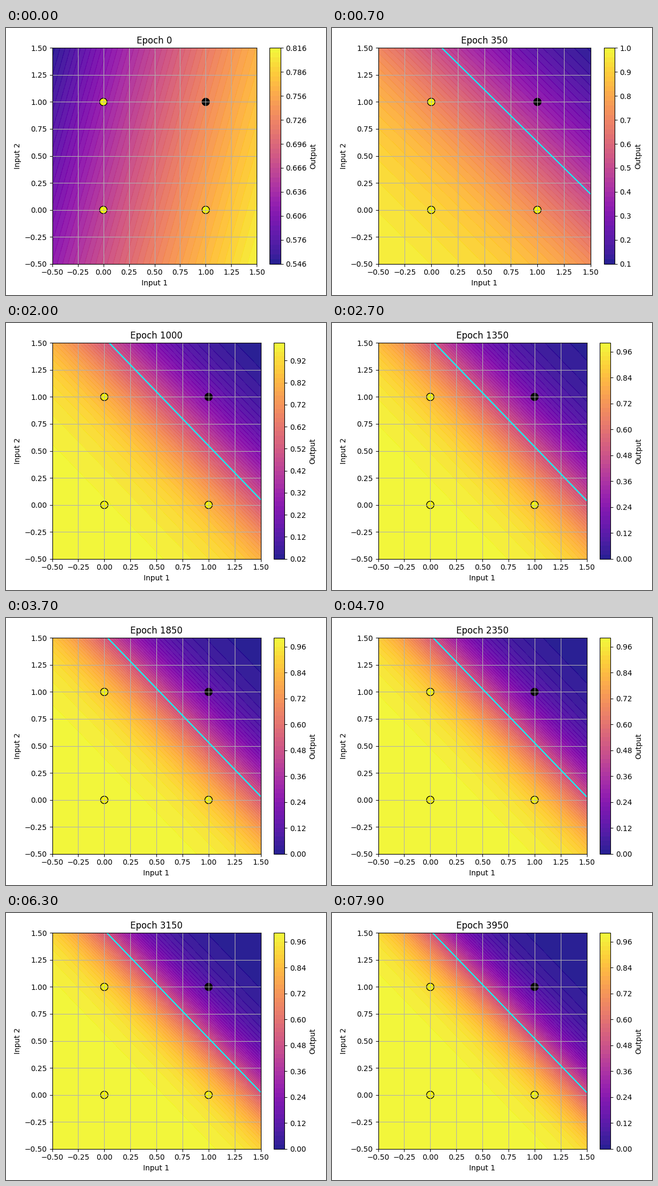
Write a matplotlib script that moves like this. It is 600 by 500 pixels and loops after 8 s.

```python
import numpy as np
import matplotlib.pyplot as plt
from matplotlib.animation import FuncAnimation

FRAMES, STEP, RATE = 80, 50, 0.1
LOW, HIGH = -0.5, 1.5
MARGINS = dict(left=0.125, right=0.9, bottom=0.11, top=0.88)

X = np.array([[0, 0], [0, 1], [1, 0], [1, 1]])
TARGET = np.array([1, 1, 1, 0])
DOTS = ["yellow" if t else "black" for t in TARGET]


def sigmoid(z):
    return 1 / (1 + np.exp(-z))


def train():
    """Fit one sigmoid neuron to NAND, keeping its state every STEP epochs."""
    rng = np.random.RandomState(42)
    w, b = rng.randn(2), rng.randn(1)
    history = []
    for epoch in range(FRAMES * STEP):
        out = sigmoid(X @ w + b)
        delta = (TARGET - out) * out * (1 - out)
        w = w + RATE * X.T @ delta
        b = b + RATE * delta.sum()
        if epoch % STEP == 0:
            history.append((w, b))
    return history


HISTORY = train()
axis = np.linspace(LOW, HIGH, 100)
xx, yy = np.meshgrid(axis, axis)

fig = plt.figure(figsize=(6, 5), dpi=100)


def draw(i):
    w, b = HISTORY[i]
    out = sigmoid(w[0] * xx + w[1] * yy + b)

    # Start each layout from the same margins so it never depends on the last
    fig.clear()
    fig.subplots_adjust(**MARGINS)
    ax = fig.add_subplot()
    field = ax.contourf(xx, yy, out, levels=50, cmap="plasma", alpha=0.9)
    fig.colorbar(field, ax=ax, label="Output")
    if out.min() < 0.5:
        ax.contour(xx, yy, out, levels=[0.5], colors="cyan")
    ax.scatter(X[:, 0], X[:, 1], s=100, c=DOTS, edgecolors="black")
    ax.set(title=f"Epoch {i * STEP}", xlabel="Input 1", ylabel="Input 2",
           xlim=(LOW, HIGH), ylim=(LOW, HIGH))
    ax.grid(True)
    fig.tight_layout()


anim = FuncAnimation(fig, draw, frames=FRAMES, interval=100, repeat=True)
plt.show()
```
